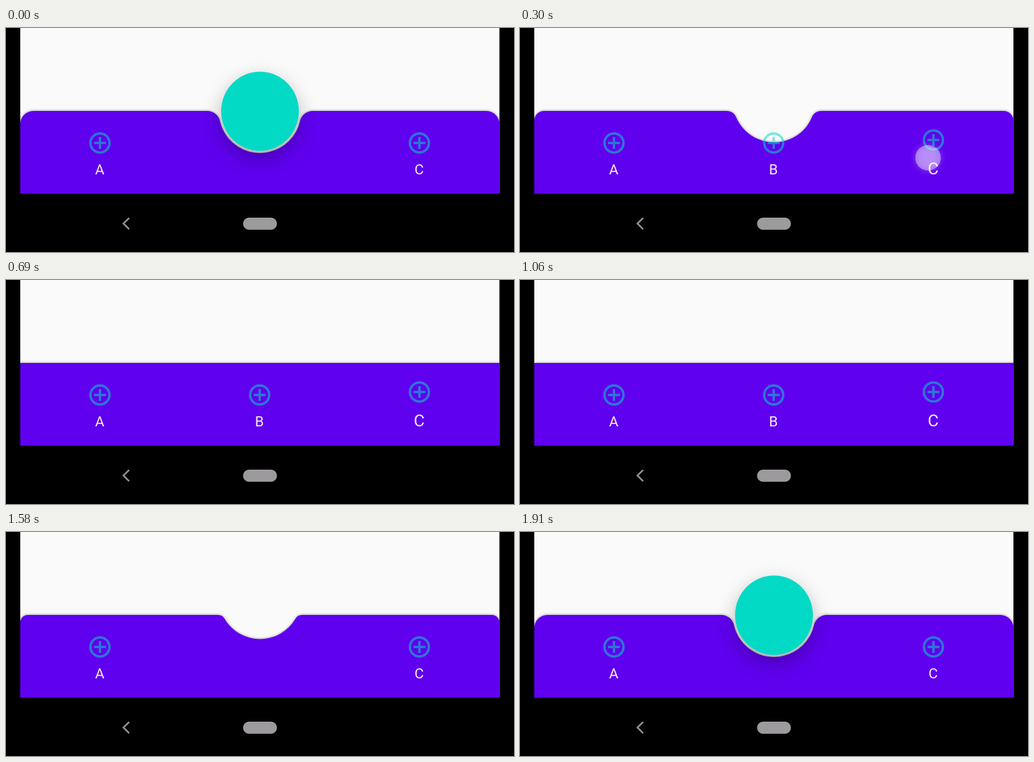
An HTML page with a canvas that plays this animation: 854 by 378 pixels, repeating every 1940 ms.

```html
<!DOCTYPE html>
<html lang="en">
<head>
<meta charset="utf-8">
<title>Bottom bar with notch</title>
<style>
  html, body { margin: 0; height: 100%; overflow: hidden; background: #000; }
  canvas { display: block; }
</style>
</head>
<body>
<canvas id="stage" width="854" height="378"></canvas>
<script>
const ctx = document.getElementById('stage').getContext('2d');
const LOOP = 1940, MID = 427, LEFT = 24, RIGHT = 829.5, TOP = 140, BOTTOM = 279.5;
const NOTCH_R = 69, CORNER_R = 22;

const ramp = (t, from, to) => Math.min(1, Math.max(0, (t - from) / (to - from)));
const smooth = u => (1 - Math.cos(u * Math.PI)) / 2;
// Rises over [a, b] and falls over [c, d].
const pulse = (t, a, b, c, d) => ramp(t, a, b) - ramp(t, c, d);

function shadow(color, blur, dy = 0) {
  ctx.shadowColor = color;
  ctx.shadowBlur = blur;
  ctx.shadowOffsetY = dy;
}

// The notch circle sinks into the bar as open goes from 0 to 1.
function drawBar(open) {
  const r = CORNER_R * open;
  const cy = TOP + 2 - 71 * (1 - open);
  const dy = TOP + r - cy;
  const dx = Math.sqrt(Math.max(0, (NOTCH_R + r) ** 2 - dy * dy));
  const tilt = Math.atan2(dy, dx);
  const up = -Math.PI / 2;

  ctx.save();
  shadow('rgba(0,0,0,.45)', 4);
  ctx.fillStyle = '#5f00ee';
  ctx.beginPath();
  ctx.moveTo(LEFT, BOTTOM);
  ctx.arc(LEFT + r, TOP + r, r, Math.PI, up);
  if (open > 0) {
    ctx.arc(MID - dx, TOP + r, r, up, -tilt);
    ctx.arc(MID, cy, NOTCH_R, Math.PI - tilt, tilt, true);
    ctx.arc(MID + dx, TOP + r, r, Math.PI + tilt, 1.5 * Math.PI);
  }
  ctx.arc(RIGHT - r, TOP + r, r, up, 0);
  ctx.lineTo(RIGHT, BOTTOM);
  ctx.fill();
  ctx.restore();
}

function drawItem(label, x, raised, alpha) {
  if (alpha <= 0) return;
  const y = 194 - 5 * raised, arm = 10;
  ctx.save();
  ctx.globalAlpha = alpha;
  ctx.strokeStyle = 'rgba(3,218,197,.54)';
  ctx.lineWidth = 4;
  ctx.beginPath();
  ctx.arc(x, y, 16, 0, 2 * Math.PI);
  ctx.moveTo(x - arm, y);
  ctx.lineTo(x + arm, y);
  ctx.moveTo(x, y - arm);
  ctx.lineTo(x, y + arm);
  ctx.stroke();
  ctx.fillStyle = '#fbe9f0';
  ctx.font = `${24 + 4 * raised}px Roboto, sans-serif`;
  ctx.textAlign = 'center';
  ctx.fillText(label, x - 0.5, 247);
  ctx.restore();
}

function drawButton(scale) {
  if (scale <= 0) return;
  ctx.save();
  ctx.globalAlpha = scale;
  shadow('rgba(0,0,0,.28)', 26 * scale + 6, 12);
  ctx.fillStyle = '#03dac5';
  ctx.beginPath();
  ctx.ellipse(MID, 140.5, 65.5 * scale, 67 * scale, 0, 0, 2 * Math.PI);
  ctx.fill();
  ctx.restore();
}

function drawTouch(x, y, alpha) {
  if (alpha <= 0) return;
  ctx.save();
  ctx.globalAlpha = alpha;
  shadow('rgba(255,255,255,.6)', 12);
  ctx.fillStyle = '#fff';
  ctx.beginPath();
  ctx.arc(x, y, 21.5, 0, 2 * Math.PI);
  ctx.fill();
  ctx.restore();
}

function drawSystemKeys() {
  ctx.strokeStyle = '#908c90';
  ctx.lineWidth = 3;
  ctx.beginPath();
  ctx.moveTo(207, 320.5);
  ctx.lineTo(197.5, 330);
  ctx.lineTo(207, 339.5);
  ctx.stroke();
  ctx.fillStyle = '#9d9a9d';
  ctx.beginPath();
  ctx.roundRect(398.5, 320, 57, 20.5, 10);
  ctx.fill();
}

function draw(t) {
  const open = 1 - smooth(ramp(t, 200, 500)) + smooth(ramp(t, 1417, 1717));
  const raised = pulse(t, 15, 130, 1430, 1545);
  const hide = 1 - ramp(t, -15, 210) ** 2.3;
  const show = 1 - (1 - ramp(t, 1715, 1915)) ** 3;

  ctx.fillStyle = '#000';
  ctx.fillRect(0, 0, 854, 378);
  ctx.fillStyle = '#fafafa';
  ctx.fillRect(LEFT, 0, RIGHT - LEFT, BOTTOM);
  drawBar(open);
  drawItem('A', 158, 0, 1);
  drawItem('B', 426.5, 0, pulse(t, 200, 250, 1420, 1470));
  drawItem('C', 695, raised, 1);
  drawButton(hide + show);
  ctx.fillStyle = '#000';
  ctx.fillRect(0, BOTTOM, 854, 378 - BOTTOM);
  drawSystemKeys();
  drawTouch(686, 219, 0.72 * pulse(t, 230, 355, 420, 560));
  drawTouch(436, 205, 0.72 * pulse(t, 1300, 1400, 1440, 1570));
}

const start = performance.now();
function tick() {
  draw((performance.now() - start) % LOOP);
  requestAnimationFrame(tick);
}
tick();
</script>
</body>
</html>
```
